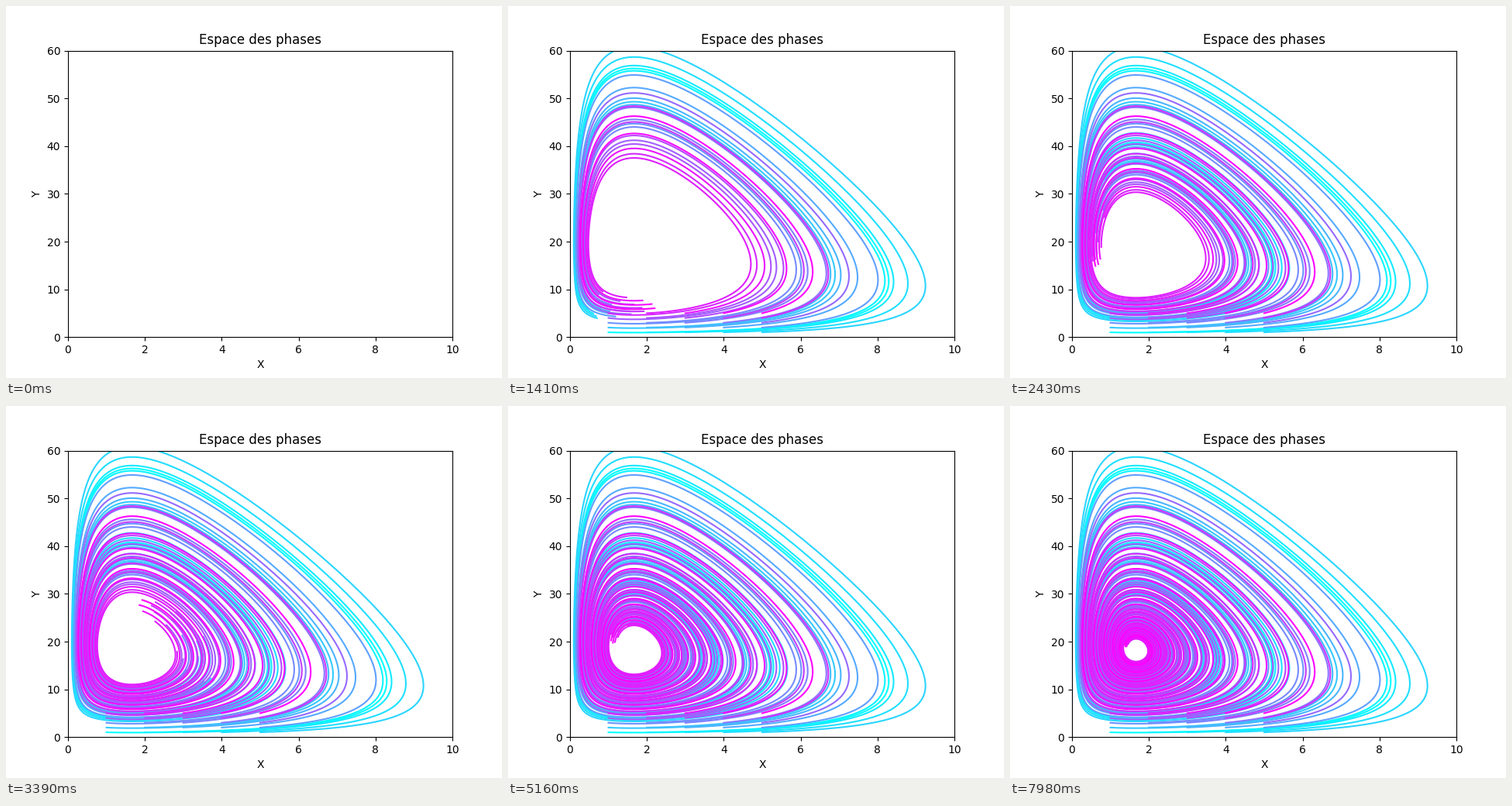
Write a matplotlib script that moves like this. It is 640 px wide and 480 px high and loops after 8 s.

```python
import numpy as np
import matplotlib.pyplot as plt
from matplotlib.animation import FuncAnimation

# Prey-predator model with logistic prey growth
GROWTH, CAPACITY, PREDATION = 1.0, 20.0, 0.05
GAIN, DEATH = 0.3, 0.5

DT = 0.02
POINTS_PER_STEP = 10
STEP_MS = 30
INTERVAL = 25
LOOP_MS = 8000
FRAMES = LOOP_MS // INTERVAL
STEPS = LOOP_MS // STEP_MS


def flow(state):
    x, y = state
    return np.array([
        GROWTH * x * (1 - x / CAPACITY) - PREDATION * x * y,
        GAIN * x * y - DEATH * y,
    ])


def rk4(state):
    k1 = flow(state)
    k2 = flow(state + DT / 2 * k1)
    k3 = flow(state + DT / 2 * k2)
    k4 = flow(state + DT * k3)
    return state + DT / 6 * (k1 + 2 * k2 + 2 * k3 + k4)


def integrate(state, count):
    path = [state]
    for _ in range(count - 1):
        path.append(rk4(path[-1]))
    return np.array(path)


starts = np.array([(x, y) for y in range(1, 6) for x in range(1, 6)], float).T
paths = integrate(starts, STEPS * POINTS_PER_STEP)

fig, ax = plt.subplots(figsize=(6.4, 4.8), dpi=100)
ax.set_xlim(0, 10)
ax.set_ylim(0, 60)
ax.set_title("Espace des phases")
ax.set_xlabel("X")
ax.set_ylabel("Y")

colors = plt.cm.cool(np.linspace(0, 1, starts.shape[1]))
lines = [ax.plot([], [], color=c, lw=1.5)[0] for c in colors]


def draw(frame):
    step = (frame * INTERVAL + INTERVAL - 1) // STEP_MS
    end = step * POINTS_PER_STEP
    for k, line in enumerate(lines):
        line.set_data(paths[:end, 0, k], paths[:end, 1, k])
    return lines


def reset():
    return draw(0)


anim = FuncAnimation(fig, draw, frames=FRAMES, init_func=reset,
                     interval=INTERVAL, repeat=True, repeat_delay=0)
plt.show()
```
